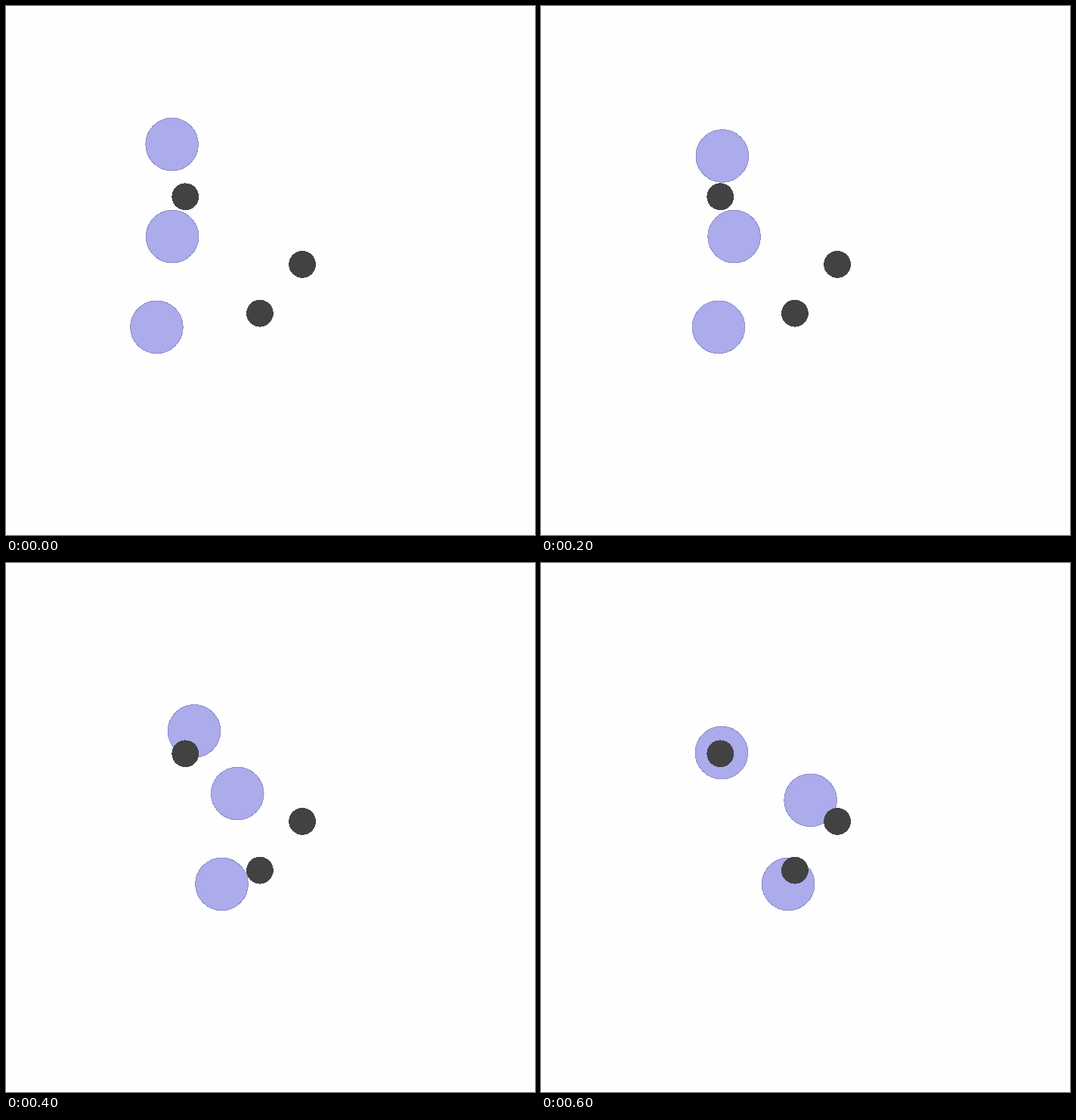
An HTML page that plays this animation: 700 by 700 pixels, repeating every 0.7 s.

```html
<!DOCTYPE html>
<html lang="en">
<head>
<meta charset="utf-8">
<title>Circles seeking dots</title>
<style>
  html, body { margin: 0; width: 100%; height: 100%; overflow: hidden; background: #fefefe; }
  svg { display: block; width: 700px; height: 700px; }
  circle { shape-rendering: crispEdges; }
  .seeker { fill: #acabeb; stroke: #8f8ec6; stroke-width: 1; }
  .dot { fill: #424242; }
</style>
</head>
<body>
<svg viewBox="0 0 700 700"></svg>
<script>
  const STEP = 100;
  const THRUST = 8.75;
  const FRICTION = 0.75;
  const DIRECTIONS = { L: [-1, 0], R: [1, 0], U: [0, -1], D: [0, 1] };

  // Each seeker gets one push per step.
  const seekers = [
    { x: 219.6, y: 183.1, pushes: "DRDLDL" },
    { x: 220.1, y: 305.1, pushes: "RRRRRD" },
    { x: 199.4, y: 424.9, pushes: "RRRRRL" }
  ];
  const dots = [{ x: 237.3, y: 252.3 }, { x: 392.1, y: 341.9 }, { x: 335.9, y: 406.7 }];
  const stepCount = seekers[0].pushes.length + 1;
  const svg = document.querySelector("svg");

  function addCircle(name, r, pos) {
    const el = document.createElementNS("http://www.w3.org/2000/svg", "circle");
    el.setAttribute("class", name);
    el.setAttribute("r", r);
    svg.append(el);
    place(el, pos);
    return el;
  }

  function place(el, { x, y }) {
    el.setAttribute("cx", x);
    el.setAttribute("cy", y);
  }

  // Seekers start already drifting right.
  function positionAt({ x, y, pushes }, step) {
    let vx = THRUST, vy = 0;
    for (const push of pushes.slice(0, step)) {
      const [dx, dy] = DIRECTIONS[push];
      vx = vx * FRICTION + dx * THRUST;
      vy = vy * FRICTION + dy * THRUST;
      x += vx;
      y += vy;
    }
    return { x, y };
  }

  const circles = seekers.map(seeker => addCircle("seeker", 34.8, seeker));
  dots.forEach(dot => addCircle("dot", 17.9, dot));

  const start = performance.now();
  function draw() {
    const time = Math.max(0, performance.now() - start);
    const step = Math.floor(time / STEP) % stepCount;
    circles.forEach((el, i) => place(el, positionAt(seekers[i], step)));
    requestAnimationFrame(draw);
  }
  draw();
</script>
</body>
</html>
```
